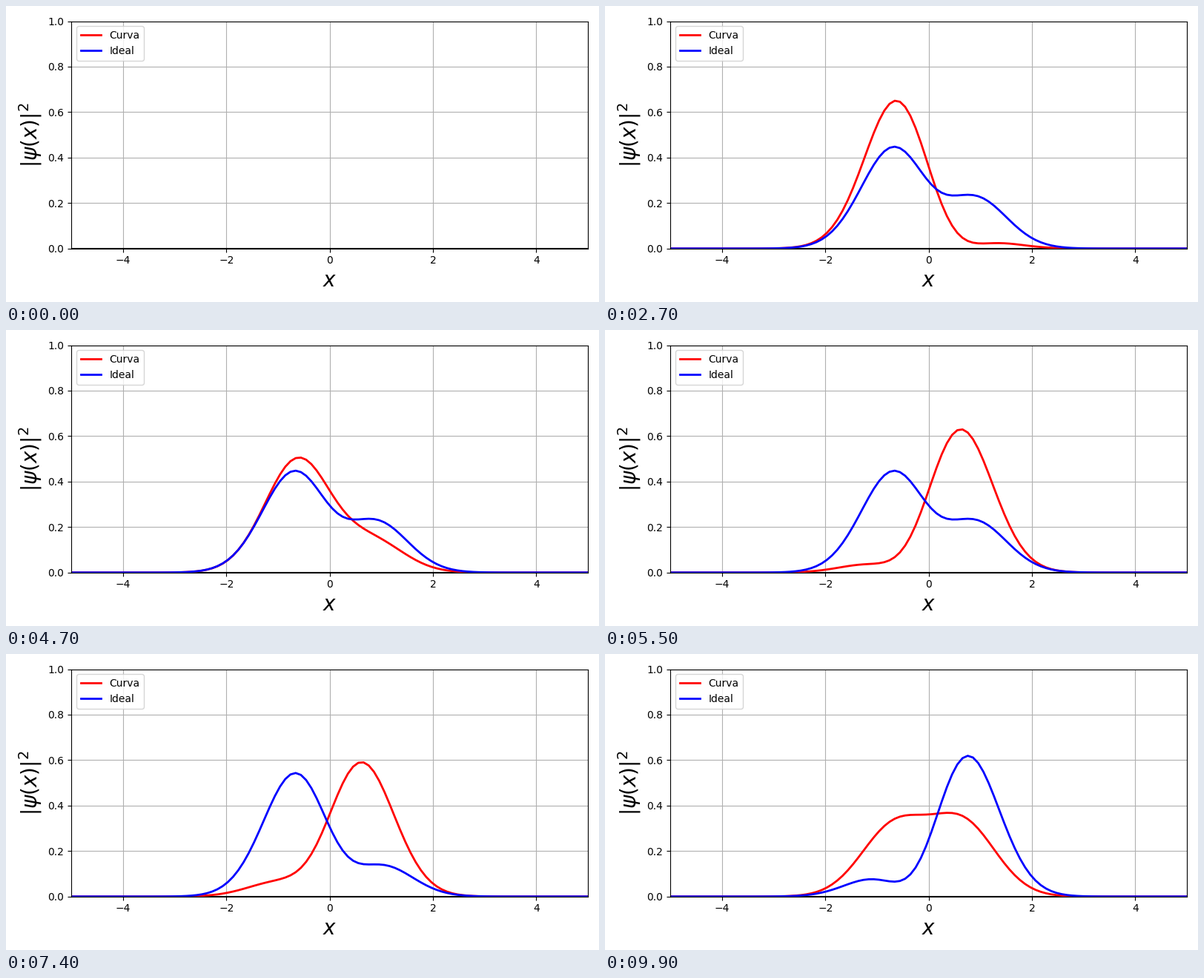
Recreate the animation shown at these times as a matplotlib script. Size 800 by 400 pixels, loop 10000 ms.

```python
import matplotlib.pyplot as plt
import numpy as np
from matplotlib.animation import FuncAnimation

FRAMES, INTERVAL = 100, 100
N = 100

x = np.linspace(-5, 5, N)
x_ideal = np.arange(N) * 0.1 - 5


def density(x, c0, c1, phase):
    """Probability density of c0|0> + c1|1> in a harmonic well."""
    ground = np.exp(-x**2 / 2) / np.pi**0.25
    excited = np.sqrt(2) * x * ground
    return np.abs(c0 * ground + c1 * excited * np.exp(-1j * phase))**2


fig, ax = plt.subplots(figsize=(8, 4), dpi=100)
ax.set_xlim(-5, 5)
ax.set_ylim(0, 1)
ax.set_xlabel(r"$x$", fontsize=20)
ax.set_ylabel(r"$|\psi(x)|^2$", fontsize=20)
ax.axhline(0, color="black")
ax.grid(True)
curve, = ax.plot([], [], color="red", lw=2, label="Curva")
ideal, = ax.plot([], [], color="blue", lw=2, label="Ideal")
ax.legend(loc="upper left")
fig.tight_layout()


def init():
    curve.set_data([], [])
    ideal.set_data([], [])
    return curve, ideal


def update(frame):
    if frame == 0:
        return init()
    step = frame - 1
    curve.set_data(x, density(x, 0.8, 0.6, np.radians(34.05 * step - 8)))
    ideal.set_data(x, density(x_ideal, 0.5**0.5, 0.5**0.5, np.pi / 10 * step))
    return curve, ideal


anim = FuncAnimation(fig, update, frames=FRAMES, init_func=init,
                     interval=INTERVAL, repeat=True, repeat_delay=0)
plt.show()
```
